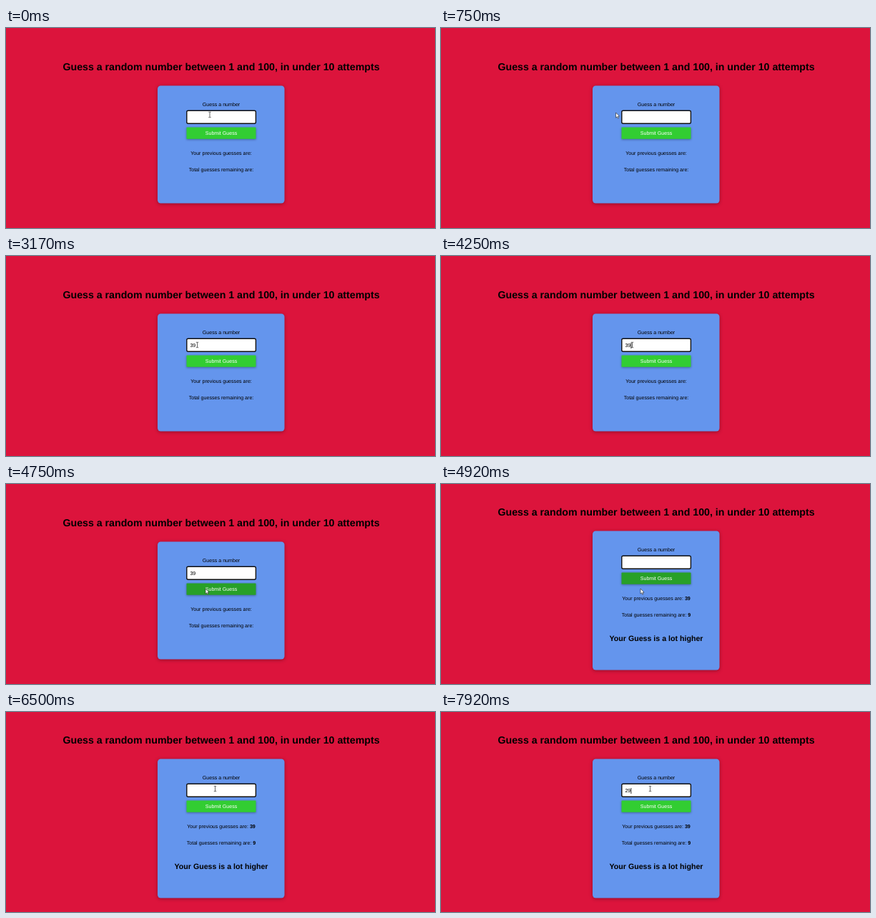
These frames come from a looping animation (600x279 px, 8000 ms). An HTML page:

```html
<!DOCTYPE html>
<html lang="en">
<head>
<meta charset="utf-8">
<title>Guess a number</title>
<style>
  html, body { margin: 0; width: 100%; height: 100%; overflow: hidden; background: #dc143c; }
  svg { display: block; width: 600px; height: 279px; }
  text { font: 7.1px "Liberation Sans", Arial, sans-serif; text-anchor: middle; text-rendering: geometricPrecision; }
  .bold { font-weight: bold; }
  #title { font-size: 14.2px; }
  #result { font-size: 10.64px; }
  #typed { text-anchor: start; }
  #card { filter: drop-shadow(0 1.5px 2.5px rgba(0, 0, 0, .35)); }
  #button { filter: drop-shadow(0 1px 1.5px rgba(0, 0, 0, .35)); }
</style>
</head>
<body>
<svg viewBox="0 0 600 279">
  <g id="page">
    <text id="title" class="bold" x="301" y="59.2">Guess a random number between 1 and 100, in under 10 attempts</text>
    <rect id="card" x="212" y="80.5" width="177.5" height="164" rx="4.4" fill="#6495ed"/>
    <text x="301" y="109">Guess a number</text>
    <rect x="252.8" y="115.3" width="96.6" height="18" rx="2" fill="#fff" stroke="#101010" stroke-width="1.4"/>
    <text id="typed" x="257.4" y="126.8"></text>
    <rect id="caret" y="121" width=".8" height="8"/>
    <rect id="button" x="252.5" y="138.6" width="97" height="16.2" rx=".6"/>
    <text x="301" y="149" fill="#fff">Submit Guess</text>
    <text x="301" y="177.3">Your previous guesses are: <tspan id="previous" class="bold"></tspan></text>
    <text x="301" y="199.5">Total guesses remaining are: <tspan id="remaining" class="bold"></tspan></text>
    <text id="result" class="bold" x="301" y="234">Your Guess is a lot higher</text>
  </g>
  <path id="beam" d="M-1.7-3.7H-.4L0-3.4.4-3.7H1.7M0-3.4V3.4M-1.7 3.7H-.4L0 3.4.4 3.7H1.7" fill="none" stroke="#333" stroke-width=".75"/>
  <path id="arrow" d="M0 0V7.2L1.7 5.7 2.8 8.2 4 7.7 2.9 5.2H5.1Z" fill="#fff" stroke="#222" stroke-width=".6"/>
</svg>
<script>
const LOOP = 8000, SUBMIT = 4830, BLINK = 333;
const $ = id => document.getElementById(id);
const clamp = v => Math.min(1, Math.max(0, v));
const show = (el, on) => el.setAttribute("visibility", on ? "visible" : "hidden");

// Pointer hotspot: time, x, y
const path = [
  [0, 285, 121], [80, 285, 121], [720, 244.5, 118], [900, 244.5, 118], [1420, 267.5, 124],
  [4250, 267.5, 124], [4700, 279, 146], [4960, 279, 146], [5420, 290.5, 112], [5830, 292.5, 107]
];
// Field content: time, text
const typing = [[0, ""], [2500, "3"], [2830, "39"], [SUBMIT, ""], [6920, "2"], [7250, "29"]];
// Periods with a visible caret when the field is empty
const emptyCaret = [[2170, 2500], [6170, 6500]];

function pointerAt(t) {
  const i = path.findIndex(p => p[0] > t);
  if (i < 0) return path[path.length - 1].slice(1);
  const [t0, x0, y0] = path[i - 1], [t1, x1, y1] = path[i];
  const u = (t - t0) / (t1 - t0), e = u * u * (3 - 2 * u);
  return [x0 + (x1 - x0) * e, y0 + (y1 - y0) * e];
}

function draw(t) {
  const submitted = t >= SUBMIT, shift = submitted ? -15 : 0;
  $("page").setAttribute("transform", `translate(0 ${shift})`);
  $("card").setAttribute("height", submitted ? 194 : 164);
  $("previous").textContent = submitted ? "39" : "";
  $("remaining").textContent = submitted ? "9" : "";
  show($("result"), submitted);

  const [since, text] = typing.filter(k => k[0] <= t).pop();
  $("typed").textContent = text;
  $("caret").setAttribute("x", 257.6 + text.length * 3.95);
  show($("caret"), text
    ? Math.floor((t - since) / BLINK) % 2 === 0
    : emptyCaret.some(([a, b]) => t >= a && t < b));

  const hover = clamp((t - 4500) / 200) - clamp((t - 5050) / 250);
  const mix = (a, b) => Math.round(a + (b - a) * hover);
  $("button").setAttribute("fill", `rgb(${mix(50, 40)},${mix(205, 160)},${mix(50, 40)})`);

  const [x, y] = pointerAt(t);
  const inField = x > 252 && x < 350 && y > 114.6 + shift && y < 134 + shift;
  for (const id of ["beam", "arrow"]) $(id).setAttribute("transform", `translate(${x} ${y})`);
  show($("beam"), inField);
  show($("arrow"), !inField);
}

const start = performance.now();
function tick() {
  draw((performance.now() - start) % LOOP);
  requestAnimationFrame(tick);
}
tick();
</script>
</body>
</html>
```
